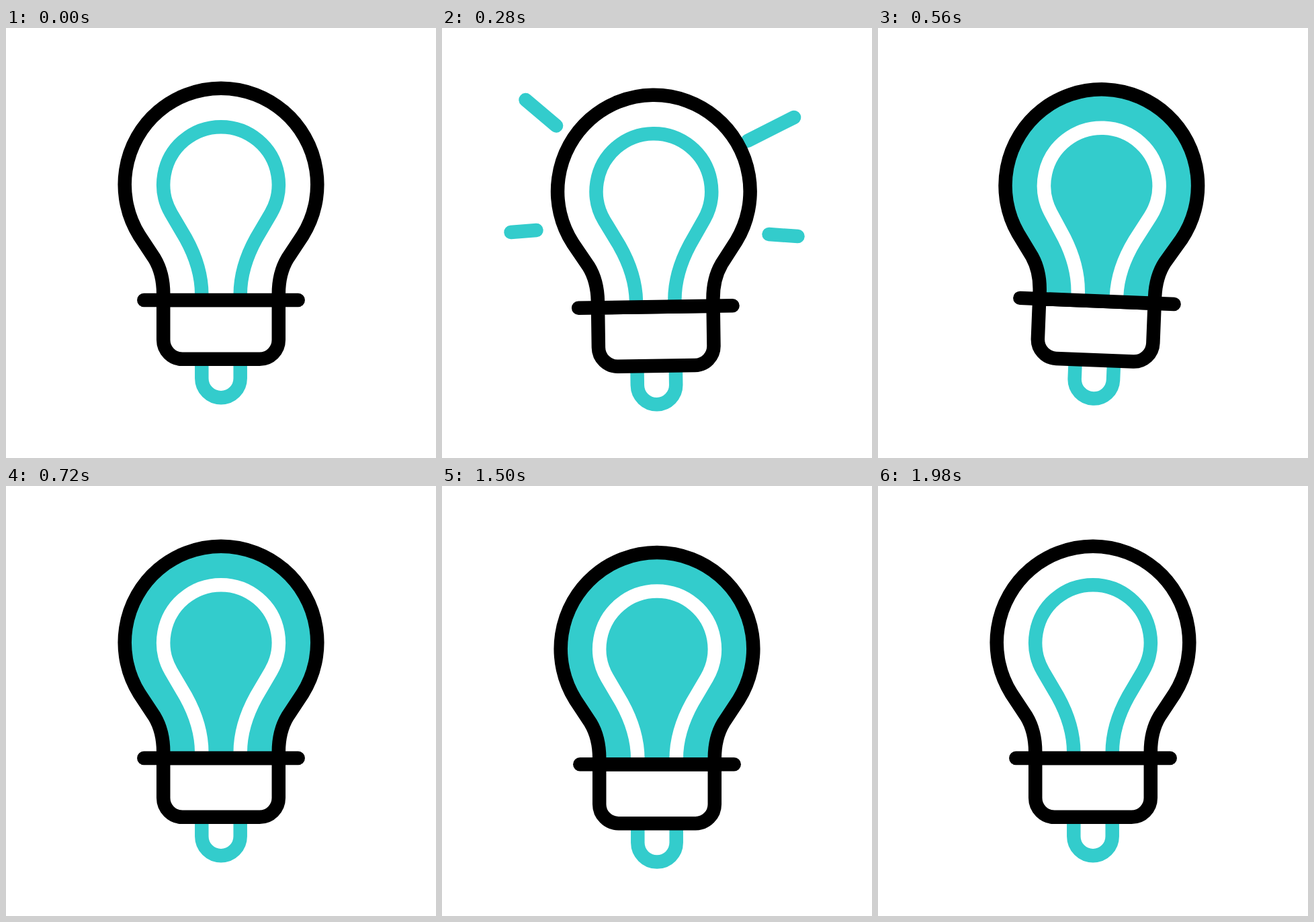
Write an HTML page that moves like this. It is 640 px wide and 640 px high and loops after 2400 ms.

```html
<!DOCTYPE html>
<html lang="en">
<head>
<meta charset="utf-8">
<title>Light bulb</title>
<style>
  html, body { margin: 0; width: 100%; height: 100%; overflow: hidden; background: #fff; }
  svg { display: block; width: 100vw; height: 100vh; }
  path { fill: none; stroke-width: 20.5; stroke-linejoin: round; }
  .ink { stroke: #000; }
  .teal { stroke: #3cc; }
  .round { stroke-linecap: round; }
</style>
</head>
<body>
<svg viewBox="0 0 640 640">
  <defs>
    <path id="glass" d="M234.2 405V396C234.2 378 230 358 221 343L198.5 309
      A143.3 143.3 0 1 1 441.5 309L419 343C410 358 405.8 378 405.8 396V405"/>
    <path id="wire" d="M291.3 405V397C291.3 367 283 341 267.5 313L245.7 275.9
      A85.8 85.8 0 1 1 394.3 275.9L372.5 313C357 341 348.7 367 348.7 397V405"/>
  </defs>
  <g id="rays"></g>
  <g id="bulb">
    <path d="M291.3 493V521.5A28.7 28.7 0 0 0 348.7 521.5V493" class="teal"/>
    <path d="M234.2 405V464.3A28.5 28.5 0 0 0 262.7 492.8H377.3A28.5 28.5 0 0 0 405.8 464.3V405Z"
      class="ink" style="fill:#fff"/>
    <use href="#glass" id="body"/>
    <use href="#wire" id="filament"/>
    <use href="#glass" class="ink"/>
    <path d="M205.3 405H434.7" class="ink round"/>
  </g>
</svg>
<script>
const LOOP = 2400, STEP = 20, ON = 20, OFF = 1280, SPAN = 700;
const $ = id => document.getElementById(id);
const clamp = x => Math.min(1, Math.max(0, x));
const part = (u, a, b) => clamp((u - a) / (b - a));
const smooth = x => x * x * (3 - 2 * x);
const mix = (a, b, k) => a + (b - a) * k;

// Time and angle of each swing
const swing = [[0, 0], [180, -5], [360, 5], [SPAN, 0]];

// Inner end, outer end
const rays = [
  [202.6, 173, 124.5, 107],
  [405.6, 193, 524, 133],
  [167.7, 298.9, 102.5, 304],
  [455.8, 304.9, 529.5, 310]
].map(ends => {
  const el = document.createElementNS("http://www.w3.org/2000/svg", "path");
  el.setAttribute("class", "teal round");
  $("rays").append(el);
  return { el, ends };
});

// The glass interior and filament inherit their paint from <use>
$("glass").style.fill = "inherit";
document.querySelectorAll("use").forEach(el => el.style.fill = "none");

function angle(u) {
  let a = 0;
  for (let i = 1; i < swing.length; i++) {
    const [t0, v0] = swing[i - 1], [t1, v1] = swing[i];
    if (u >= t0 && u <= t1) a = mix(v0, v1, smooth(part(u, t0, t1)));
  }
  return a;
}

function drop(u) {
  return u < 260 ? 10 * smooth(part(u, 0, 260)) : 10 * (1 - part(u, 260, SPAN)) ** 2;
}

function blend(from, to, k) {
  return `rgb(${from.map((v, i) => Math.round(mix(v, to[i], k)))})`;
}

function drawRays(u) {
  const tail = smooth(part(u, 180, 360)), head = smooth(part(u, 100, 260));
  for (const { el, ends: [x0, y0, x1, y1] } of rays) {
    const at = k => `${mix(x0, x1, k)} ${mix(y0, y1, k)}`;
    el.style.display = head > tail ? "" : "none";
    el.setAttribute("d", `M${at(tail)}L${at(head)}`);
  }
}

function draw(t) {
  const on = clamp((t - ON) / SPAN) * SPAN;
  const off = clamp((t - OFF) / SPAN) * SPAN;
  const lit = part(on, 280, 360) - part(off, 280, 360);
  const white = [255, 255, 255], teal = [51, 204, 204];
  $("bulb").setAttribute("transform",
    `translate(0 ${drop(on) + drop(off)}) rotate(${angle(on)} 320 555)`);
  $("body").style.fill = blend(white, teal, lit);
  $("filament").style.stroke = blend(teal, white, lit);
  drawRays(on);
}

function tick() {
  const t = performance.now() % LOOP;
  draw(Math.floor(t / STEP) * STEP);
  requestAnimationFrame(tick);
}
tick();
</script>
</body>
</html>
```
